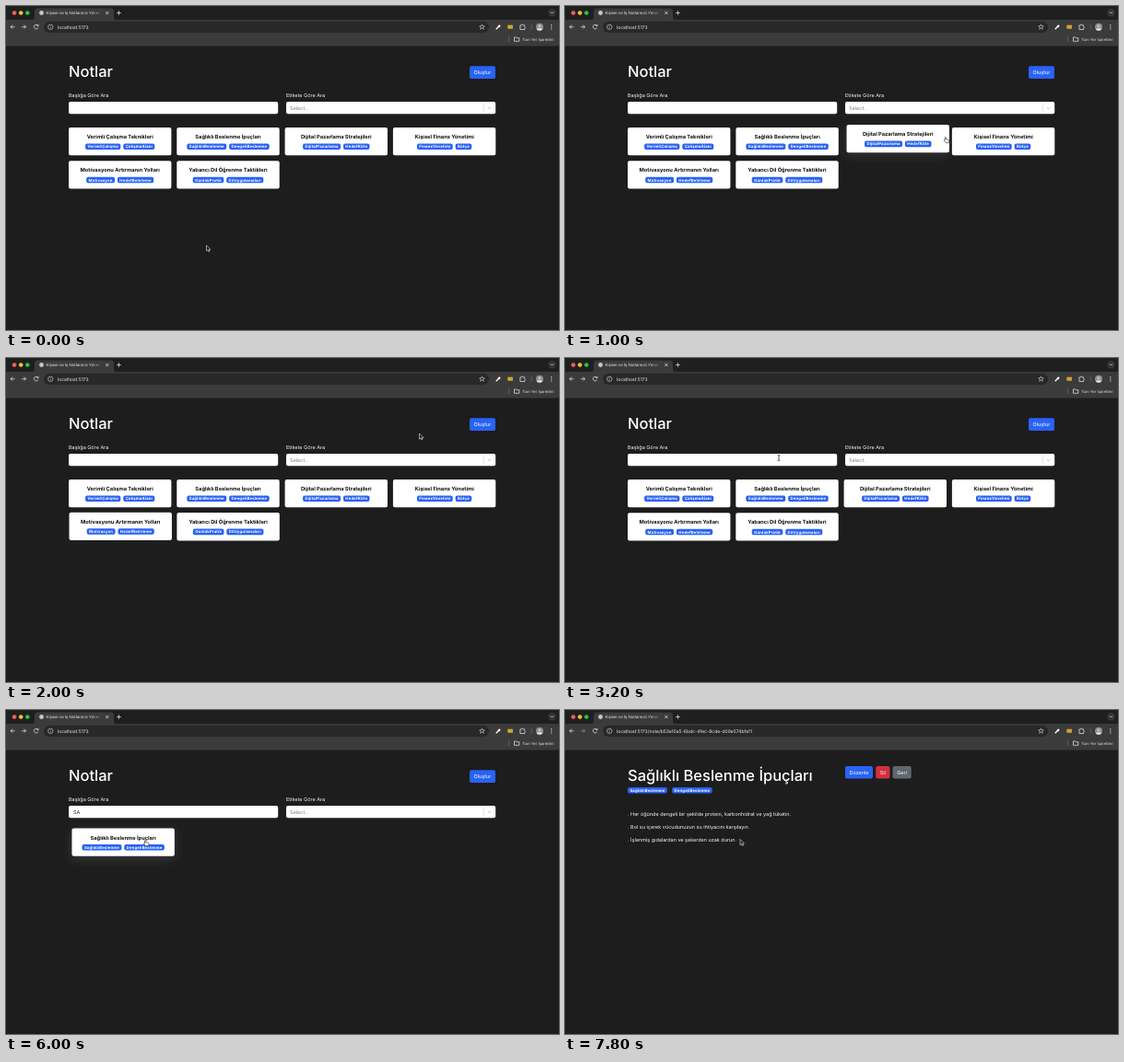
Recreate the animation shown at these times as an HTML page. Size 600 px wide and 352 px high, loop 8 s.

```html
<!DOCTYPE html>
<html lang="tr">
<head>
<meta charset="utf-8">
<title>Notlar</title>
<style>
  html, body { margin: 0; width: 600px; height: 352px; overflow: hidden; background: #1d1d1d; }
  svg { display: block; font-family: Inter, sans-serif; text-rendering: geometricPrecision; }
  .tag { font-size: 4.3px; font-weight: 700; letter-spacing: .14px; fill: #fff; }
</style>
</head>
<body>
<svg width="600" height="352" viewBox="0 0 600 352">
  <defs>
    <linearGradient id="fade"><stop offset=".84" stop-color="#ececec"/><stop offset="1" stop-color="#ececec" stop-opacity=".1"/></linearGradient>
    <clipPath id="face"><circle cx="579" cy="22.8" r="4"/></clipPath>
  </defs>
  <path fill="#1e2020" d="M0 0H600V15H0z"/>
  <path fill="#3b3b3b" d="M0 15H28Q31 15 31 12V6Q31 2.5 34.5 2.5H113.5Q117 2.5 117 6V12Q117 15 120 15H600V43.5H0z"/>
  <circle cx="9" cy="7.5" r="2.3" fill="#ff5f57"/>
  <circle cx="16.2" cy="7.5" r="2.3" fill="#febc2e"/>
  <circle cx="23.3" cy="7.5" r="2.3" fill="#28c840"/>
  <circle cx="38.5" cy="7.5" r="2.4" fill="#d9c3bb"/>
  <text x="43.5" y="9.1" font-size="4.3" fill="url(#fade)">Kişisel ve İş Notlarınızı Yöneti</text>
  <rect x="41" y="16.7" width="483" height="12.4" rx="6.2" fill="#282828"/>
  <text id="url" x="56" y="24.6" font-size="5" fill="#ececec"></text>
  <rect x="544.3" y="20.7" width="5.6" height="4" fill="#d0a62c"/>
  <g clip-path="url(#face)">
    <path fill="#8d918c" d="M575 18.5h8v9h-8z"/>
    <circle cx="579" cy="21.8" r="1.6" fill="#d2b9a4"/>
    <path fill="#e3ddd5" d="M575.5 27.5a3.5 3.5 0 0 1 7 0z"/>
  </g>
  <circle cx="592.5" cy="7.2" r="4.2" fill="#343636"/>
  <g fill="#dedede">
    <circle cx="591.8" cy="20.7" r=".65"/><circle cx="591.8" cy="22.8" r=".65"/><circle cx="591.8" cy="24.9" r=".65"/>
    <text x="560" y="37.6" font-size="4.2">Tüm Yer İşaretleri</text>
  </g>
  <g fill="none" stroke="#dedede" stroke-width=".8">
    <path d="M108.2 5.9l3.2 3.2m0-3.2l-3.2 3.2M120.2 7.5h4.6m-2.3-2.3v4.6M591 6.5l1.5 1.5 1.5-1.5"/>
    <path d="M9.4 22.7H5m2-2-2 2 2 2M34.7 21.5a2.3 2.3 0 1 0 .1 2M35 19.9v1.8h-1.8"/>
    <path id="forward" d="M17.2 22.7h4.4m-2-2 2 2-2 2"/>
    <path stroke-width=".6" d="M48.3 22.5v1.7m0-3v.6M51 22.8a2.7 2.7 0 1 1-5.4 0a2.7 2.7 0 1 1 5.4 0z"/>
    <path stroke-width=".6" d="M516.5 19.9l.8 1.9 2 .1-1.6 1.3.6 2-1.8-1.1-1.8 1.1.6-2-1.6-1.3 2-.1z"/>
    <path stroke="#fff" stroke-width="1.3" d="M531.7 25.2l3.2-3.2m-.9-.9l1.9 1.9m-.8-1.1l1.1-1.1"/>
    <path d="M557.9 20.9h1.6a.9.9 0 0 1 1.8 0h1.4v1.6a.9.9 0 0 1 0 1.7v1.3h-4.8z"/>
    <path stroke="#666" d="M545.5 33v6M570.3 20v5.5"/>
    <path d="M551.5 33.9h2l.7.8h2.6v3.6h-5.3z"/>
  </g>
  <g id="page"></g>
  <g id="pointer"></g>
</svg>

<script>
const LOOP = 8000, STEP = 200, BLUE = '#2962f6';
const notes = [
  ['Verimli Çalışma Teknikleri', 'VerimliÇalışma', 'ÇalışmaAlanı'],
  ['Sağlıklı Beslenme İpuçları', 'SağlıklıBeslenme', 'DengeliBeslenme'],
  ['Dijital Pazarlama Stratejileri', 'DijitalPazarlama', 'HedefKitle'],
  ['Kişisel Finans Yönetimi', 'FinansYönetimi', 'Bütçe'],
  ['Motivasyonu Artırmanın Yolları', 'Motivasyon', 'HedefBelirleme'],
  ['Yabancı Dil Öğrenme Taktikleri', 'GünlükPratik', 'DilUygulamaları']
];
const advice = [
  '. Her öğünde dengeli bir şekilde protein, karbonhidrat ve yağ tüketin.',
  '. Bol su içerek vücudunuzun su ihtiyacını karşılayın.',
  '. İşlenmiş gıdalardan ve şekerden uzak durun.'
];
// Pointer path: time, x, y
const path = [
  [0, 217.5, 260], [200, 175, 222], [400, 130, 180], [600, 235, 155], [800, 299, 150],
  [1000, 412, 142], [1200, 475, 148], [1400, 260, 182], [1800, 150, 180], [2000, 448.5, 82],
  [2200, 575, 27], [2400, 518, 72], [2800, 515, 73], [3000, 380, 95], [3200, 232, 108.5],
  [3600, 216, 111], [5400, 216, 111], [5800, 165, 135], [6400, 121, 153], [6800, 119.5, 153.5],
  [7200, 119.5, 153.5], [7400, 150, 150], [7600, 285, 146], [7800, 190, 140.5], [LOOP, 190, 140.5]
];
const shapes = {
  arrow: '<path d="M0 0V6.1L1.5 4.8L2.5 7L3.5 6.5L2.5 4.5H4.4z" fill="#111" stroke="#eee" stroke-width=".6"/>',
  hand: '<path d="M.2.8Q.8-.2 1.4.8V2.7L4.3 3.3Q4.9 3.5 4.8 4.3L4.2 6.7H1.3L-.9 4.2Q-.9 3.3.2 4z" fill="#fff" stroke="#222" stroke-width=".6"/>',
  beam: '<path d="M-1.3-3Q0-3 0-2.2Q0-3 1.3-3M0-2.2V2.2M-1.3 3Q0 3 0 2.2Q0 3 1.3 3" fill="none" stroke="#222" stroke-width=".8"/>'
};

const $ = id => document.getElementById(id);
const pen = document.createElement('canvas').getContext('2d');
pen.font = '700 430px Inter, sans-serif';
const tagWidth = name => pen.measureText(name).width / 100 + name.length * .14 + 4.8;

const inside = ([px, py], x, y, w, h) => px >= x && px <= x + w && py >= y && py <= y + h;
const cardBox = slot => [68, 132].map((v, i) => v + (i ? (slot >> 2) * 36.2 : slot % 4 * 117.3)).concat(111.4, 30.3);
const rect = (x, y, w, h, fill, rx = 0, style = '') =>
  `<rect x="${x}" y="${y}" width="${w}" height="${h}" rx="${rx}" fill="${fill}" style="${style}"/>`;
// y is the middle of the capitals
const text = (x, y, size, str, fill = '#f6f6f6', extra = '') =>
  `<text x="${x}" y="${y + size * .364}" font-size="${size}" fill="${fill}" ${extra}>${str}</text>`;
const centred = 'text-anchor="middle"';
const heading = str => text(68, 71.3, 16.5, str, '#fff', 'font-weight="500"');
const button = (x, y, w, h, fill, label) =>
  rect(x, y, w, h, fill, 2) + text(x + w / 2, y + h / 2, 5.5, label, '#fff', centred);

function tags(names, x, y, gap) {
  return names.map(name => {
    const w = tagWidth(name), left = x;
    x += w + gap;
    return rect(left, y, w, 6.6, BLUE, 2) + `<text class="tag" x="${left + 2.4}" y="${y + 4.85}">${name}</text>`;
  }).join('');
}

function pointerAt(t) {
  const i = path.findIndex(p => p[0] > t), a = path[i - 1], b = path[i];
  const k = (t - a[0]) / (b[0] - a[0]);
  return [a[1] + (b[1] - a[1]) * k, a[2] + (b[2] - a[2]) * k];
}

const typedAt = t => t < 4000 ? '' : t < 4200 ? 'S' : 'SA';
const pointerHidden = t => t >= 4000 && t < 5400;

function stateAt(t) {
  const query = typedAt(t).toLowerCase(), at = pointerAt(t);
  const shown = notes.filter(n => n[0].toLowerCase().includes(query));
  const hovered = pointerHidden(t) ? undefined : shown.find((n, slot) => inside(at, ...cardBox(slot)));
  return { at, shown, hovered };
}

// Hovered cards rise, the others settle; replayed so it depends on time alone
function liftsAt(t) {
  const lifts = notes.map(() => 0);
  for (let s = 0; s <= t; s += STEP) {
    const { hovered } = stateAt(s);
    notes.forEach((n, i) => lifts[i] += ((n === hovered) - lifts[i]) * .82);
  }
  return lifts;
}

function card([title, ...names], slot, lift) {
  const [x, y, w, h] = cardBox(slot), d = 3.6 * lift, gap = 2.9;
  const row = names.reduce((sum, name) => sum + tagWidth(name) + gap, -gap);
  const glow = lift > .01 ? `filter:drop-shadow(0 3px 6px rgba(255,255,255,${.13 * lift}))` : '';
  return `<g transform="translate(${d} ${-d})">` + rect(x, y, w, h, '#fff', 2, glow) +
    text(x + w / 2, y + 10.1, 5.73, title, '#111', centred + ' font-weight="700"') +
    tags(names, x + (w - row) / 2, y + 17.5, gap) + '</g>';
}

function listPage(t, { shown }, onButton) {
  const lifts = liftsAt(t);
  const caret = t >= 3600 && t < 4800 || t >= 5400 && t < 6000;
  const caretX = 73 + [0, 3.6, 7.3][typedAt(t).length];
  return heading('Notlar') +
    button(503, 65.3, 28, 13.6, onButton ? '#2456d6' : BLUE, 'Oluştur') +
    text(68, 97.2, 5.5, 'Başlığa Göre Ara') + text(304, 97.2, 5.5, 'Etikete Göre Ara') +
    rect(68, 104, 227.2, 13.3, '#fff', 2) + rect(304, 104, 227.2, 13.3, '#fff', 2) +
    text(73, 110.9, 5.5, typedAt(t), '#222') +
    (caret ? rect(caretX, 107.5, .6, 7, '#222') : '') +
    text(308, 110.9, 5.5, 'Select...', '#808080') + rect(518, 106.5, .5, 8.5, '#ccc') +
    '<path d="M522.8 110l1.9 1.9 1.9-1.9" fill="none" stroke="#bbb" stroke-width=".9"/>' +
    shown.map((n, slot) => card(n, slot, lifts[notes.indexOf(n)])).join('') +
    (onButton && t >= 2600 ? rect(0, 343.5, 50, 8.5, '#3b3b3b') +
      text(3, 348, 4.3, 'localhost:5173/new', '#d6d6d6') : '');
}

function notePage() {
  const [title, ...names] = notes[1];
  return heading(title) + tags(names, 68, 84, 5.2) +
    button(304, 61, 30, 13.4, BLUE, 'Düzenle') +
    button(337.2, 61, 15.2, 13.4, '#d32f3f', 'Sil') +
    button(355.5, 61, 20.2, 13.4, '#5f676f', 'Geri') +
    advice.map((line, i) => text(68, 112.9 + i * 14.3, 5.47, line)).join('');
}

function draw(t) {
  const state = stateAt(t), { at } = state, reading = t >= 7400;
  const onButton = inside(at, 503, 65, 28, 14);
  const onField = inside(at, 68, 104, 227, 13.5);
  const kind = reading ? 'arrow' : state.hovered || onButton ? 'hand' : onField ? 'beam' : 'arrow';
  $('url').textContent = 'localhost:5173' + (reading ? '/note/b53e10a5-6bdc-4fec-8cde-d09e574bfa11' : '');
  $('forward').setAttribute('stroke', reading ? '#8b8b8b' : '#dedede');
  $('page').innerHTML = reading ? notePage() : listPage(t, state, onButton);
  $('pointer').innerHTML = pointerHidden(t) ? '' : shapes[kind];
  $('pointer').setAttribute('transform', `translate(${at})`);
}

let last = -1;
function tick() {
  const t = Math.floor(performance.now() % LOOP / STEP) * STEP;
  if (t !== last) draw(last = t);
  requestAnimationFrame(tick);
}
tick();
</script>
</body>
</html>
```
